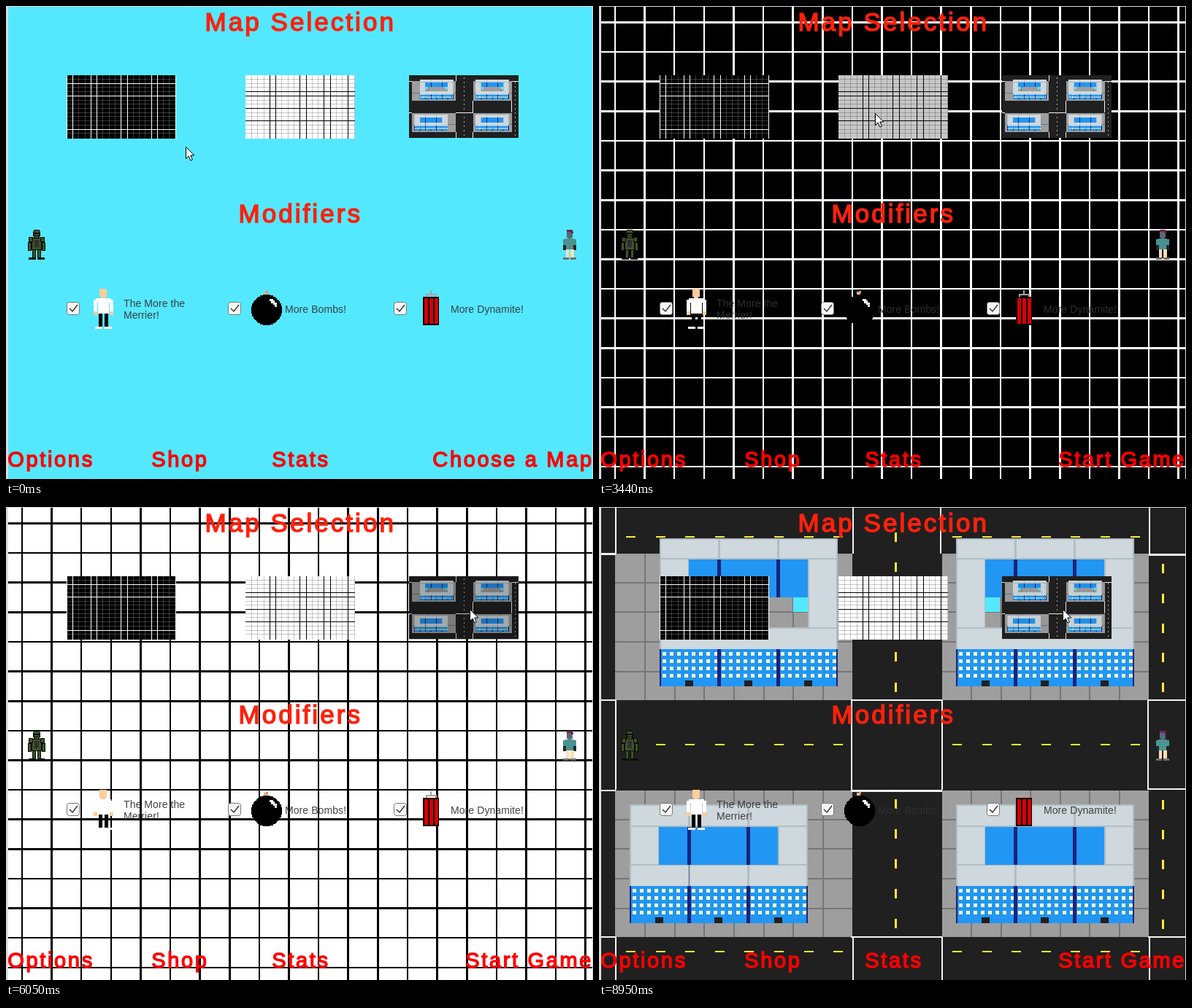
An HTML page that plays this animation: 804x649 px, repeating every 9050 ms.

```html
<!DOCTYPE html>
<html lang="en">
<head>
<meta charset="utf-8">
<title>Map Selection</title>
<style>
html, body { margin: 0; width: 100%; height: 100%; overflow: hidden; background: #dcdcdc; }
svg { display: block; width: 804px; height: 649px; }
text { font-family: "Liberation Sans", Arial, sans-serif; white-space: pre; }
.title { font-size: 35px; letter-spacing: 3.05px; fill: #ff210d; stroke: #ff210d; stroke-width: 1.5; }
.button { font-size: 29px; letter-spacing: 2.65px; fill: #f00; stroke: #f00; stroke-width: 1.4; }
.label { font-size: 14px; letter-spacing: .08px; fill: #323232; fill-opacity: .92; }
</style>
</head>
<body>
<svg id="stage" viewBox="0 0 804 649" shape-rendering="crispEdges"></svg>
<script>
const LOOP = 9050;
const TILE = 40.62;
const CYAN = '#54e8ff', ROAD = '#202020', BLUE = '#2196f3', NAVY = '#1a237e';
const ROOF = '#cfd8dc', TRIM = '#b0bec5', SKIN = '#ffcc99';
const stage = document.getElementById('stage');

const rect = (x, y, w, h, fill, extra = '') =>
  `<rect x="${x}" y="${y}" width="${w}" height="${h}" fill="${fill}" ${extra}/>`;
const text = (x, y, cls, str, extra = '') =>
  `<text x="${x}" y="${y}" class="${cls}" ${extra}>${str}</text>`;
const times = (n, fn) => Array.from({ length: n }, (_, i) => fn(i)).join('');

// Full-size board: lines one art pixel thick, snapped to whole pixels
function board(paper, ink) {
  const line = (i, start) => {
    const a = Math.round(start + i * TILE);
    return [a, Math.round(start + i * TILE + 2.56) - a];
  };
  return rect(3, 1, 800, 648, paper) +
    times(20, i => { const [x, w] = line(i, 20.66); return rect(x, 1, w, 648, ink); }) +
    times(16, i => { const [y, h] = line(i, 21.25); return rect(3, y, 800, h, ink); });
}

function pavement(x, y, w, h) {
  let out = rect(x, y, w, h, '#9e9e9e');
  for (let gx = 21.5; gx < x + w - 6; gx += TILE)
    if (gx > x + 4) out += rect(Math.round(gx), y, 2, h, '#757575');
  for (let gy = 21.5; gy < y + h - 6; gy += TILE)
    if (gy > y + 4) out += rect(x, Math.round(gy), w, 2, '#757575');
  return out;
}

function offices(x, y) {
  let out = rect(x, y, 244, 51, BLUE);
  out += times(24, c => times(4, r =>
    rect(Math.round(x + 3.5 + c * 10.15), Math.round(y + 4 + r * 10.15), 5, 5, '#fff9c4')));
  out += times(3, i => rect(x + 35 + Math.round(i * 81.3), y + 43, 11, 8, ROAD));
  return out + rect(x, y, 2, 51, NAVY) + rect(x + 79, y, 5, 51, NAVY) +
    rect(x + 160, y, 5, 51, NAVY) + rect(x + 242, y, 2, 51, NAVY);
}

function building(x, y, yard) {
  const top = yard ? 29 : 31;
  const low = top + 51 + (yard ? 42 : 0);
  let out = rect(x, y, 244, low + 30, TRIM);
  out += rect(x + 2, y + 2, 240, low + 28, ROOF);
  out += [40, 203].map(d => rect(x + d - 1, y + top, 3, low - top, TRIM)).join('');
  out += [80, 161].map(d => rect(x + d, y, 3, top, TRIM) + (yard ? '' : rect(x + d, y + low, 3, 30, TRIM))).join('');
  out += rect(x, y + top - 2, 244, 2, TRIM) + rect(x, y + low, 244, 2, TRIM);
  out += rect(x + 40, y + top, 163, 52, BLUE);
  out += rect(x + 79, y + top, 5, 52, NAVY) + rect(x + 160, y + top, 5, 52, NAVY);
  if (yard) {
    out += pavement(x + 40, y + 81, 163, 41);
    out += rect(x + 40, y + 81, 20, 20, CYAN) + rect(x + 183, y + 81, 20, 20, CYAN);
  }
  return out + offices(x, y + low + 30);
}

function blocks() {
  let out = rect(3, 1, 800, 648, ROAD);
  const white = (x, y, w, h) => rect(x, y, w, h, '#f4f4f4');
  out += pavement(22, 64, 325, 201) + pavement(470, 64, 283, 201);
  out += pavement(22, 389, 325, 201) + pavement(470, 389, 283, 201);

  out += [22, 347, 467, 753].map(x => white(x, 1, 2, 63)).join('');
  out += white(3, 63, 20, 3) + white(753, 64, 50, 3);
  out += [22, 345, 469, 751].map(x => white(x, 265, 2, 123)).join('');
  out += [22, 347, 469, 753].map(x => white(x, 590, 2, 59)).join('');
  for (const y of [264, 388, 589])
    out += white(3, y, 20, 2) + white(345, y, 125, y === 388 ? 3 : 2) + white(752, y === 388 ? 386 : y, 51, 2);

  out += building(83, 43, true) + building(489, 43, true);
  out += building(42, 408, false) + building(489, 408, false);
  return out + rect(123, 490, 1, 81, NAVY, 'opacity=".5"');
}

function laneMarks() {
  const dash = (x, y, tall) => rect(Math.round(x), Math.round(y), tall ? 3 : 13, tall ? 13 : 2, '#ffeb3b');
  let out = '';
  for (const y of [40, 325, 609]) {
    const first = y === 325 ? 1 : 0;
    out += times(8 - first, i => dash(37 + (i + first) * TILE, y));
    out += times(7, i => dash(484 + i * TILE, y));
  }
  out += times(6, i => dash(405, 35 + i * 41.1, true));
  return out + times(5, i =>
    dash(405, 401 + i * 41, true) + dash(771, 78 + i * 40.8, true) + dash(771, 402 + i * 41, true));
}

// Small boards: a few lines survive at full strength, the rest are faint
function thumb(x, paper, ink, strongX, strongY) {
  const level = ok => `opacity="${ok ? 1 : .22}"`;
  return rect(x, 95, 150, 87, paper) +
    times(18, i => rect(Math.round(x + 8 + i * 8.28), 95, 1, 87, ink, level(strongX.includes(i)))) +
    times(14, i => rect(x, Math.round(100 + i * 5.72), 150, 1, ink, level(strongY.includes(i))));
}

const shade = (id, x) => rect(x, 95, 150, 87, '#000', `id="${id}" opacity="0"`);

function checkbox(x) {
  return `<g shape-rendering="auto"><rect x="${x + .5}" y="406.5" width="17" height="17" rx="3" fill="#f6f6f6" stroke="#777"/>
    <path d="M${x + 4} 415l4 4 7-9" fill="none" stroke="#323232" stroke-width="1.4"/></g>`;
}

function person() {
  const arm = x => rect(x, 403, 5, 16, '#fff') + rect(x, 419, 5, 5, SKIN);
  return rect(128, 388, 10, 11, SKIN) + rect(130, 398, 6, 3, SKIN) +
    rect(123, 401, 21, 6, '#fff') + rect(126, 401, 15, 21, '#fff') + arm(120) + arm(142) +
    rect(127, 422, 5, 18, '#000') + rect(135, 422, 5, 18, '#000') +
    rect(122, 440, 10, 3, '#fff') + rect(135, 440, 10, 3, '#fff');
}

function bomb() {
  const px = 1.31, r = 16;
  let out = times(32, i => {
    const half = Math.round(Math.sqrt(r * r - (i - 15.5) ** 2)) * px;
    return rect(357 - half, 396 + i * px, half * 2, px + .1, '#000');
  });
  out += rect(353, 392, 5, 4, '#d9b48f') + rect(356, 391, 3, 3, '#f08a4b');
  out += rect(361, 402, 5, 3, '#fff') + rect(363, 404, 5, 4, '#fff');
  return out + rect(366, 407, 5, 3, '#fff') + rect(368, 409, 3, 4, '#ddd');
}

function dynamite() {
  const fuse = '#b0a0a0';
  return rect(581, 390, 2, 5, fuse) + rect(575, 395, 14, 2, fuse) + rect(575, 395, 2, 4, fuse) +
    rect(588, 395, 2, 4, fuse) + rect(571, 399, 22, 39, '#000') +
    [573, 580, 587].map(x => rect(x, 401, 5, 35, '#d60000')).join('');
}

function robot() {
  const green = '#40522a', dark = '#0a0d06';
  const box = (x, y, w, h) => rect(x, y, w, h, dark) + rect(x + 1, y + 1, w - 2, h - 2, green);
  return box(38, 307, 8, 12) + rect(37, 309, 10, 7, dark) + rect(38, 309, 8, 2, green) + rect(39, 313, 6, 2, green) +
    box(35, 318, 14, 17) + rect(39, 321, 6, 10, '#2c3134') +
    box(31, 317, 6, 7) + box(47, 317, 6, 7) + box(30, 324, 5, 12) + box(49, 324, 5, 12) +
    box(36, 334, 5, 12) + box(43, 334, 5, 12) +
    rect(31, 345, 10, 3, dark) + rect(43, 345, 10, 3, dark);
}

function walker() {
  return rect(768, 309, 8, 9, '#596878') + rect(768, 307, 8, 3, '#6b2350', 'id="hat"') +
    rect(774, 309, 3, 3, '#6b2350') + rect(770, 317, 4, 3, '#596878') +
    rect(766, 319, 12, 15, '#4b9292', 'id="shirt"') + rect(763, 320, 18, 8, '#4b9292', 'id="sleeves"') +
    rect(763, 328, 4, 7, '#22242e') + rect(777, 328, 4, 7, '#22242e') +
    rect(767, 334, 4, 11, '#ffe0b5') + rect(773, 334, 5, 11, '#ffe0b5') +
    rect(763, 345, 8, 3, '#6d7070') + rect(773, 345, 8, 3, '#6d7070');
}

stage.innerHTML = `
  <defs>
    <g id="blocks">${blocks()}</g>
    <clipPath id="frame"><rect x="552" y="95" width="150" height="86"/></clipPath>
  </defs>
  ${rect(0, 0, 804, 649, '#dcdcdc')}
  <g id="bg0">${rect(3, 1, 800, 648, CYAN)}</g>
  <g id="bg1">${board('#000', '#fff')}</g>
  <g id="bg2">${board('#fff', '#000')}</g>
  <g id="bg3"><use href="#blocks"/>${laneMarks()}</g>
  ${thumb(83, '#000', '#fff', [0, 3, 4, 8, 9, 13, 14], [1, 4, 12])}
  ${rect(83, 95, 1, 87, '#fff')}${rect(232, 95, 1, 87, '#fff')}
  ${thumb(328, '#fff', '#000', [3, 4, 8, 9, 12, 13, 16], [3, 4, 7, 10])}
  <g clip-path="url(#frame)"><use href="#blocks" transform="translate(551.4 95) scale(.1875 .1325)"/>
    <path d="M627.5 98V181M697.5 104V181" stroke="#aaa" stroke-dasharray="2 4"/></g>
  ${shade('shade0', 83)}${shade('shade1', 328)}${shade('shade2', 552)}
  ${robot()}${walker()}
  ${checkbox(83)}${checkbox(304)}${checkbox(531)}
  ${person()}${bomb()}${dynamite()}
  ${text(161, 412.5, 'label', 'The More the')}
  ${text(161, 428.5, 'label', 'Merrier!')}
  ${text(382, 420.5, 'label', 'More Bombs!')}
  ${text(609, 420.5, 'label', 'More Dynamite!')}
  ${text(272.5, 33.5, 'title', 'Map Selection')}
  ${text(318.5, 297, 'title', 'Modifiers')}
  ${text(2.3, 631.5, 'button', 'Options')}
  ${text(199.3, 631.5, 'button', 'Shop')}
  ${text(364.3, 631.5, 'button', 'Stats')}
  ${text(584.3, 631.5, 'button', 'Choose a Map', 'id="choose"')}
  ${text(629.3, 631.5, 'button', 'Start Game', 'id="start"')}
  <path id="cursor" d="M.5 .5v16l3.7-3.5 2.6 6 2.6-1.1-2.6-5.9h5z" fill="#fff" stroke="#000" shape-rendering="auto"/>`;

const el = id => document.getElementById(id);
const show = (id, on) => el(id).setAttribute('display', on ? 'inline' : 'none');

// Pointer stops: time, x, y
const path = [
  [0, 246, 193], [120, 246, 193], [390, 197, 163], [950, 197, 163], [1220, 195, 154],
  [2000, 195, 154], [2090, 195, 152], [2900, 370, 150], [3300, 378, 147], [4160, 378, 147],
  [4310, 393, 147], [5100, 620, 141], [5400, 635, 140], [LOOP, 635, 140]
];
// Per map: pointer enters, press, release, pointer leaves
const visits = [[300, 1220, 1370, 2300], [2750, 3300, 3590, 4700], [4900, 5900, 6200, LOOP]];

function pointer(t) {
  const i = Math.max(1, path.findIndex(p => p[0] >= t));
  const [t0, x0, y0] = path[i - 1], [t1, x1, y1] = path[i];
  const k = (t - t0) / (t1 - t0);
  return [x0 + (x1 - x0) * k, y0 + (y1 - y0) * k];
}

function draw(t) {
  const scene = visits.filter(v => t >= v[2]).length;
  for (let i = 0; i < 4; i++) show('bg' + i, i === scene);
  show('choose', scene === 0);
  show('start', scene > 0);
  visits.forEach(([enter, press, release, leave], i) => {
    const tint = t < enter || t >= leave ? 0 : t >= press && t < release ? .22 : .04;
    el('shade' + i).setAttribute('opacity', tint);
  });
  const [x, y] = pointer(t);
  el('cursor').setAttribute('transform', `translate(${Math.round(x)} ${Math.round(y)})`);

  const glow = t < 950 ? 0 : Math.sin((t - 950) / 1270 * 2 * Math.PI);
  el('hat').setAttribute('fill', `hsl(${322 - 6 * glow} 50% ${28 + 2 * glow}%)`);
  for (const id of ['shirt', 'sleeves']) el(id).setAttribute('fill', `hsl(180 32% ${43 + glow}%)`);
}

const began = performance.now();
function tick() {
  draw((performance.now() - began) % LOOP);
  requestAnimationFrame(tick);
}
tick();
</script>
</body>
</html>
```
